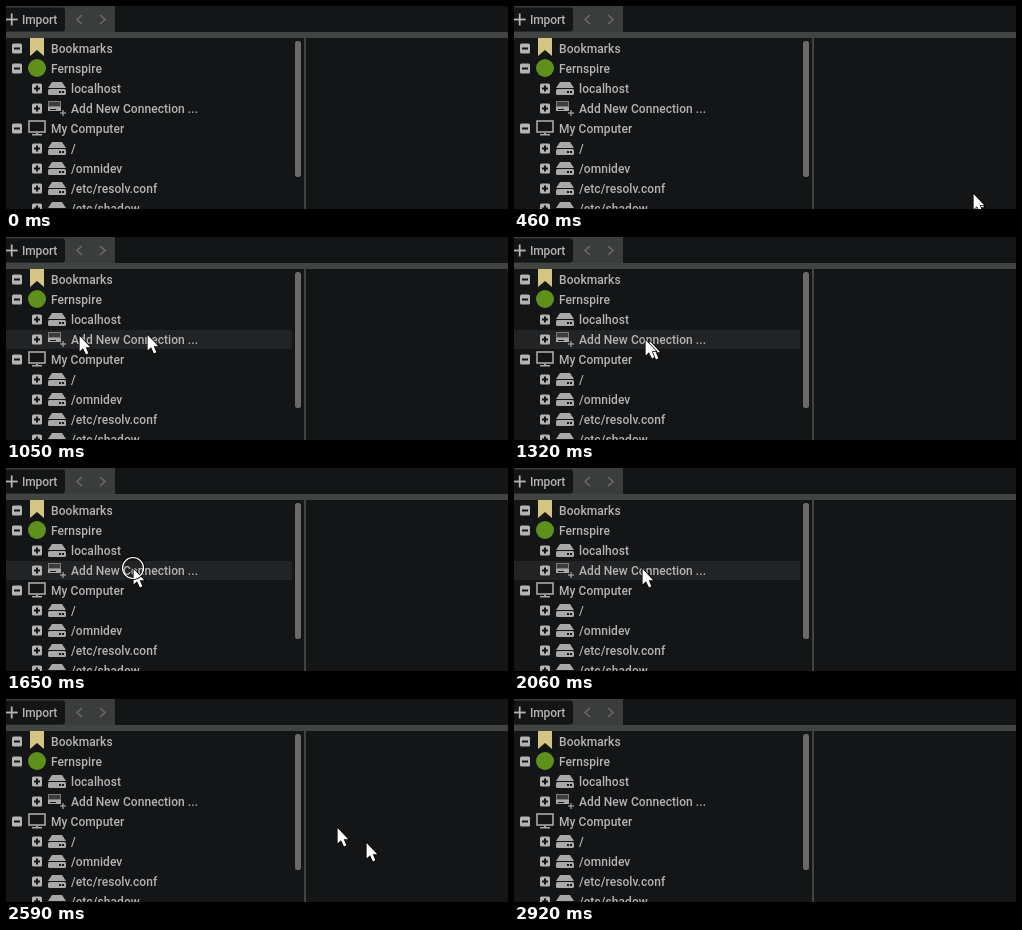
Write an HTML page with a canvas that moves like this. It is 502 px wide and 203 px high and loops after 3.51 s.

```html
<!DOCTYPE html>
<html lang="en">
<head>
<meta charset="utf-8">
<title>File browser</title>
<style>
  html, body { margin: 0; width: 100%; height: 100%; overflow: hidden; background: #141517; }
  canvas { display: block; }
</style>
</head>
<body>
<canvas id="stage" width="502" height="203"></canvas>
<script>
const ctx = document.getElementById('stage').getContext('2d');
const LOOP = 3510;
const STEP = 66.7;
const BG = '#141517', INK = '#b4b4b4', ICON = '#a8a8a8', BAR = '#424442';

// Turning points of the pointer
const keys = [
  { n: 0, x: 456, y: 200 },
  { n: 1, x: 459, y: 189 },
  { n: 2, x: 459, y: 187 },
  { n: 7, x: 335, y: 105 },
  { n: 8, x: 289, y: 97 },
  { n: 12, x: 45, y: 98 },
  { n: 14, x: 135, y: 103 },
  { n: 16, x: 127, y: 100 },
  { n: 26, x: 128, y: 100 },
  { n: 30, x: 195, y: 99 },
  { n: 31, x: 230, y: 102 },
  { n: 33, x: 331, y: 128 },
  { n: 38, x: 446, y: 211 }
];
const last = keys.length - 1;

function secant(i, axis) {
  return (keys[i + 1][axis] - keys[i][axis]) / (keys[i + 1].n - keys[i].n);
}

// Slope that never overshoots a turning point
function slope(i, axis) {
  if (i === 0) return secant(0, axis);
  if (i === last) return secant(last - 1, axis);
  const a = secant(i - 1, axis), b = secant(i, axis);
  return a * b > 0 ? 2 * a * b / (a + b) : 0;
}

function position(n, axis) {
  if (n >= keys[last].n) return keys[last][axis];
  const i = keys.findLastIndex(k => k.n <= n);
  const h = keys[i + 1].n - keys[i].n, u = (n - keys[i].n) / h;
  const ease = u * u * (3 - 2 * u);
  return keys[i][axis] * (1 - ease) + keys[i + 1][axis] * ease
    + h * u * (1 - u) * ((1 - u) * slope(i, axis) - u * slope(i + 1, axis));
}

function rect(x, y, w, h, color) {
  ctx.fillStyle = color;
  ctx.fillRect(x, y, w, h);
}

function round(x, y, w, h, r, color) {
  ctx.fillStyle = color;
  ctx.beginPath();
  ctx.roundRect(x, y, w, h, r);
  ctx.fill();
}

function trace(points) {
  ctx.beginPath();
  points.forEach(([x, y]) => ctx.lineTo(x, y));
}

function poly(points, color) {
  trace(points);
  ctx.closePath();
  ctx.fillStyle = color;
  ctx.fill();
}

function circle(x, y, r) {
  ctx.beginPath();
  ctx.arc(x, y, r, 0, Math.PI * 2);
}

function plus(x, y, size, width, color) {
  rect(x - size / 2, y - width / 2, size, width, color);
  rect(x - width / 2, y - size / 2, width, size, color);
}

function label(text, x, y, spacing = 0.06) {
  ctx.font = '500 12px Roboto, Arial, sans-serif';
  ctx.letterSpacing = spacing + 'px';
  ctx.fillStyle = INK;
  ctx.fillText(text, x, y);
}

function toggle(x, y, open) {
  round(x - 5, y - 5, 10, 10, 1.5, INK);
  if (open) rect(x - 3, y - 1, 6, 2, BG);
  else plus(x, y, 6, 2, BG);
}

function bookmark(y) {
  poly([[24, y - 11], [38, y - 11], [38, y + 7], [31, y + 1], [24, y + 7]], '#d3c683');
}

function emblem(y) {
  circle(31, y - 1, 9);
  ctx.fillStyle = '#5f901c';
  ctx.fill();
}

function drive(y) {
  poly([[46, y - 7], [56, y - 7], [60, y - 1], [42, y - 1]], ICON);
  round(42, y, 18, 6, 1.5, ICON);
  rect(53, y + 2, 2, 2, BG);
  rect(56, y + 2, 2, 2, BG);
}

function addDrive(y) {
  rect(42, y - 8, 13, 7, '#7c7c7c');
  rect(43, y - 7, 11, 4, '#3c3c3c');
  rect(42, y - 2, 13, 4, ICON);
  rect(44, y, 6, 1, BG);
  plus(57, y + 4, 6, 1.2, ICON);
}

function monitor(y) {
  ctx.strokeStyle = ICON;
  ctx.lineWidth = 1.6;
  ctx.strokeRect(23, y - 8, 16, 11);
  rect(30, y + 4, 2, 2, ICON);
  rect(26, y + 5, 10, 1.5, ICON);
}

const rows = [
  { text: 'Bookmarks', icon: bookmark, open: true },
  { text: 'Fernspire', icon: emblem, open: true },
  { text: 'localhost', icon: drive },
  { text: 'Add New Connection ...', icon: addDrive },
  { text: 'My Computer', icon: monitor, open: true },
  { text: '/', icon: drive },
  { text: '/omnidev', icon: drive },
  { text: '/etc/resolv.conf', icon: drive },
  { text: '/etc/shadow', icon: drive }
];

function toolbar() {
  rect(0, 0, 109, 26, '#3b3c3c');
  rect(0, 26, 502, 6, BAR);
  round(-4, 1.5, 63, 24, 3, BG);
  plus(5.7, 13.5, 12, 1.8, INK);
  label('Import', 16, 18, -0.12);
  ctx.strokeStyle = '#696969';
  ctx.lineWidth = 1.6;
  for (const [x, dir] of [[76, -1], [94, 1]]) {
    trace([[x, 9], [x + 5 * dir, 13.5], [x, 18]]);
    ctx.stroke();
  }
}

function tree(hover) {
  if (hover) rect(0, 93, 286, 19, '#222325');
  rows.forEach(({ text, icon, open }, i) => {
    const y = 43 + i * 20, indent = open ? 0 : 20;
    toggle(11 + indent, y - 0.5, open);
    icon(y);
    label(text, 45 + indent, y + 4);
  });
}

const arrow = [[0.6, 1], [0.6, 16.4], [4, 13.2], [7, 19.4], [9.4, 18.3], [6.7, 12.2], [11.2, 12.2]];

function pointer(n) {
  if (n < 0) return;
  ctx.save();
  ctx.translate(Math.round(position(n, 'x')), Math.round(position(n, 'y')));
  trace(arrow);
  ctx.closePath();
  ctx.strokeStyle = '#000';
  ctx.lineWidth = 1.4;
  ctx.stroke();
  poly(arrow, '#fff');
  ctx.restore();
}

function ring(x, y) {
  for (const [r, color] of [[11.3, '#000'], [10.5, '#fff']]) {
    circle(x, y, r);
    ctx.strokeStyle = color;
    ctx.lineWidth = 1.2;
    ctx.stroke();
  }
}

function draw(t) {
  const n = Math.floor((t - 316) / STEP);
  rect(0, 0, 502, 203, BG);
  toolbar();
  tree(n >= 9 && n < 32);
  rect(298, 32, 2, 171, BAR);
  round(289, 35, 6, 136, 2.5, '#6a6a6a');

  // The recorder leaves the previous pointer visible for one step
  pointer(n - 1);
  pointer(n);
  if (t >= 1650 && t < 1790) ring(127, 100);
}

const start = performance.now();
function tick() {
  draw((performance.now() - start) % LOOP);
  requestAnimationFrame(tick);
}
tick();
</script>
</body>
</html>
```
